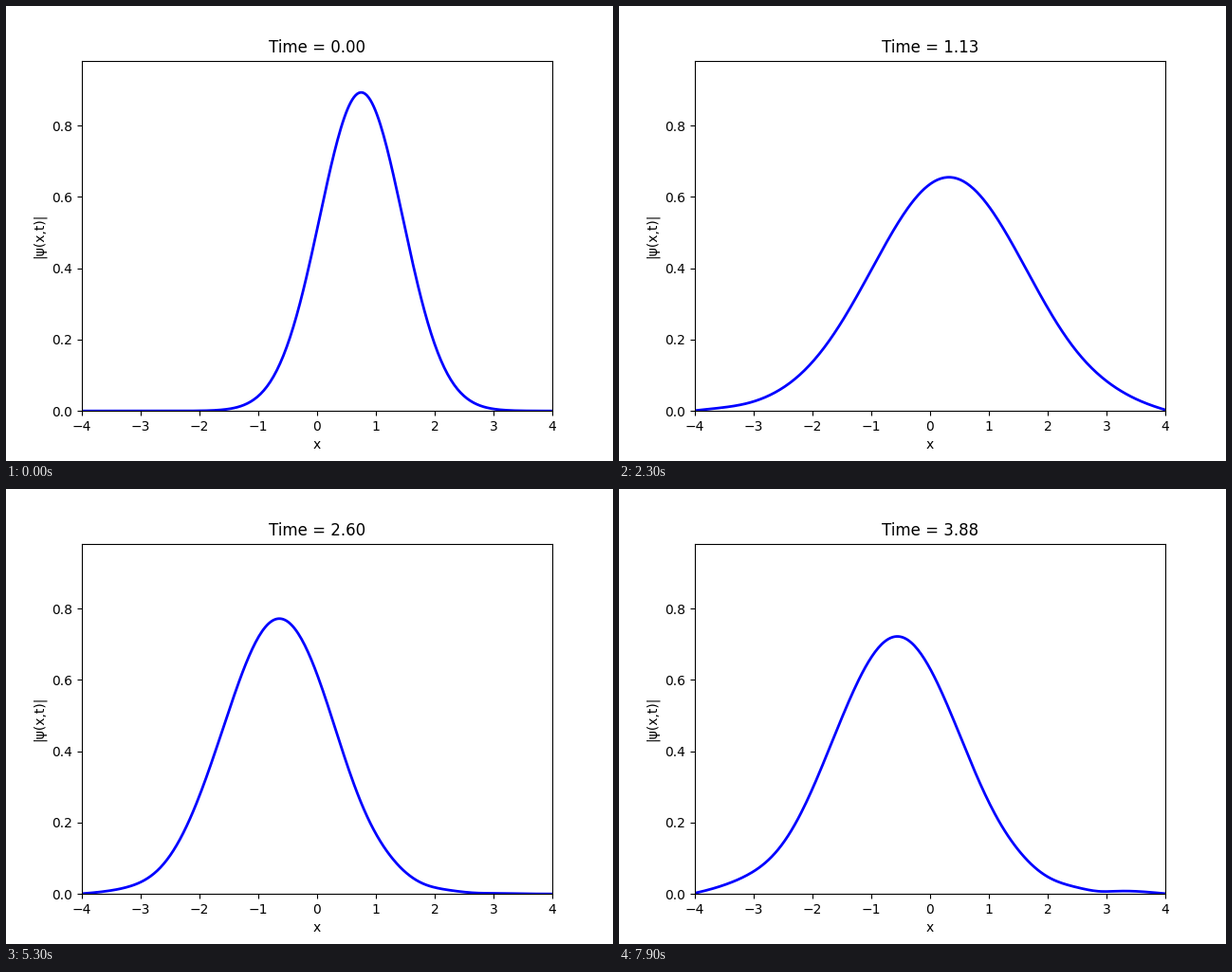
These frames come from a looping animation (640 px wide and 480 px high, 8 s). A matplotlib script:

```python
import numpy as np
import matplotlib.pyplot as plt
from matplotlib.animation import FuncAnimation

FRAMES, INTERVAL = 80, 100
DT = np.pi / 64
X0 = 0.75       # starting centre of the packet
WALL = 4.06     # hard walls just outside the visible range

# Harmonic oscillator between the walls, by finite differences
grid = np.linspace(-WALL, WALL, 292)
dx = grid[1] - grid[0]
x = grid[1:-1]
hop = np.full(x.size - 1, -0.5 / dx**2)
H = np.diag(1 / dx**2 + x**2 / 2) + np.diag(hop, 1) + np.diag(hop, -1)
energy, modes = np.linalg.eigh(H)

psi0 = (2 / np.pi) ** 0.25 * np.exp(-(x - X0) ** 2)
coef = modes.T @ psi0


def amplitude(t):
    return np.abs(modes @ (coef * np.exp(-1j * energy * t)))


fig, ax = plt.subplots(figsize=(6.4, 4.8), dpi=100)
line, = ax.plot(x, psi0, color="blue", lw=2)
ax.set_xlim(-4, 4)
ax.set_ylim(0, 1.1 * psi0.max())
ax.set_xlabel("x")
ax.set_ylabel("|ψ(x,t)|")
title = ax.set_title("Time = 0.00")


def update(i):
    t = i * DT
    line.set_ydata(amplitude(t))
    title.set_text(f"Time = {t:.2f}")
    return line, title


anim = FuncAnimation(fig, update, frames=FRAMES, interval=INTERVAL,
                     repeat=True, repeat_delay=0, blit=False)
plt.show()
```
